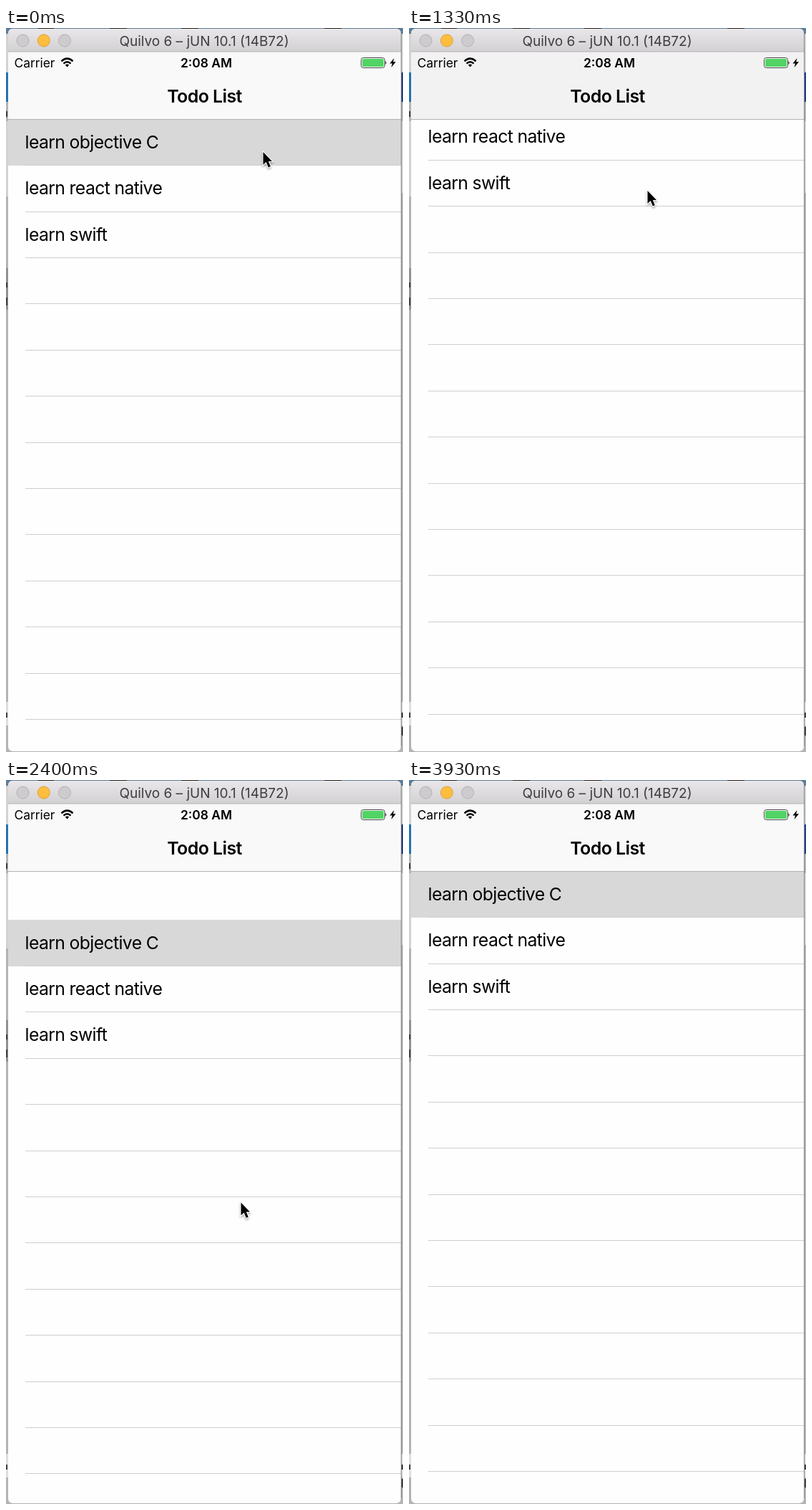
Recreate the animation shown at these times as an HTML page. Size 555x1010 px, loop 4.07 s.

```html
<!DOCTYPE html>
<html lang="en">
<head>
<meta charset="utf-8">
<title>Todo List</title>
<style>
  html, body { margin: 0; width: 100%; height: 100%; overflow: hidden; background: #b4b4b4; }
  svg { display: block; width: 555px; height: 1010px; font-family: Inter, Roboto, sans-serif; }
  .row { font-size: 24.7px; letter-spacing: -.6px; }
  .nav { font-size: 24.9px; font-weight: 600; letter-spacing: -.55px; }
  .status { font-size: 17.4px; }
  .mid { text-anchor: middle; }
</style>
</head>
<body>
<svg viewBox="0 0 555 1010">
  <defs>
    <linearGradient id="bar" x2="0" y2="1">
      <stop stop-color="#e9e7e9"/><stop offset="1" stop-color="#d2d0d2"/>
    </linearGradient>
    <clipPath id="window"><path d="M3 8q0-7 7-7H545q7 0 7 7V1002q0 7-7 7H10q-7 0-7-7Z"/></clipPath>
    <filter id="shadow" x="-50%" y="-50%" width="200%" height="200%">
      <feDropShadow dx="0" dy="2" stdDeviation="1.5" flood-opacity=".35"/>
    </filter>
  </defs>

  <!-- desktop showing around the window -->
  <rect width="555" height="1010" fill="#b4b4b4"/>
  <rect width="555" height="8" fill="#5d7d98"/>
  <path d="M45 0h22M145 0h24M245 0h24M445 0h24" stroke="#222" stroke-width="3"/>
  <path d="M0 8h3v54H0ZM552 8h3v54h-3ZM0 130h3v105H0ZM552 130h3v100h-3Z" fill="#d2d2d2"/>
  <path d="M0 62h3v41H0Z" fill="#2474b5"/>
  <path d="M552 62h3v41h-3Z" fill="#203f8e"/>
  <path d="M0 335h3v58H0Z" fill="#929292"/>
  <path d="M0 940h3v33H0ZM553 940h2v33h-2Z" fill="#dedede"/>
  <path d="M0 116h2v8H0ZM0 355h2v7H0ZM0 376h2v11H0ZM0 955h2v7H0ZM553 955h2v7h-2ZM553 975h2v12h-2Z" fill="#444"/>
  <path d="M552.5 8V1002" stroke="#858585"/>

  <g clip-path="url(#window)">
    <rect width="555" height="1010" fill="#fefefe"/>
    <rect id="selected" x="3" width="549" height="65" fill="#d8d8d8"/>
    <path id="lines" stroke="#cfced2"/>
    <g id="labels"></g>

    <rect x="3" y="33" width="549" height="94.5" fill="#f9f9f9"/>
    <rect id="tint" x="3" y="33" width="549" height="94.5"/>
    <path d="M3 127.5H552" stroke="#b3b3b3"/>
    <text class="nav mid" x="277.5" y="104">Todo List</text>

    <text class="status" x="11.5" y="55">Carrier</text>
    <text class="status mid" x="280" y="55" font-weight="600">2:08 AM</text>
    <g fill="none" stroke="#000" stroke-width="2.5">
      <path d="M77.5 46.3q8-7.4 16 0M80.5 49.6q5-4.6 10 0"/>
      <path d="M82.8 51.6q2.7-2.3 5.4 0L85.5 54.6Z" fill="#000" stroke="none"/>
    </g>
    <rect x="496.5" y="41.5" width="33" height="14" rx="3" fill="#fff" stroke="#444"/>
    <rect x="498" y="43" width="30" height="11" rx="1.5" fill="#51d465"/>
    <path d="M530.5 46q2.2 2.5 0 5ZM542.5 42L536.5 49.5H540L538.5 55L545 47.2H541.2Z"/>

    <rect x="3" y="1" width="549" height="32" fill="url(#bar)"/>
    <path d="M3 33H552" stroke="#b5b3b5"/>
    <g stroke="#b3b1b3" fill="#cdcbcd">
      <circle cx="23.5" cy="17.5" r="8.5"/>
      <circle cx="52.8" cy="17.5" r="8.5" fill="#fdbd3f" stroke="#dfa136"/>
      <circle cx="82" cy="17.5" r="8.5"/>
    </g>
    <text class="mid" x="277" y="24.7" font-size="19" fill="#3e3c3e">Quilvo 6 – jUN 10.1 (14B72)</text>
  </g>

  <path id="cursor" d="M.5 1V18.8L4.7 15L7.8 22.4L10.8 21.1L7.8 14H13Z"
        stroke="#fff" stroke-width="2" paint-order="stroke" filter="url(#shadow)"/>
</svg>

<script>
const LOOP = 4070, STEP = 200 / 3, RELEASE = 2140, PULL = 153.7;
const ROW = 64.4, TOP = 127.2;
const [selected, lines, labels, tint, cursor] =
  ['selected', 'lines', 'labels', 'tint', 'cursor'].map(id => document.getElementById(id));

labels.innerHTML = ['learn objective C', 'learn react native', 'learn swift']
  .map((label, i) => `<text class="row" x="26.5" y="${167.8 + i * ROW}">${label}</text>`)
  .join('');

// [time, value] keys
const dragKeys = [[0, 0], [270, 0], [470, 38], [600, 36.3], [1270, -82], [1330, -72.6], [1730, 116.2], [2100, PULL], [RELEASE, PULL]];
const cursorX = [[0, 359], [600, 350], [1330, 333], [1730, 350], [2130, 328], [2430, 328], [2900, -30]];
const cursorY = [[0, 172], [300, 260], [470, 331], [600, 328], [1200, 108], [1330, 223.5], [1730, 505], [2100, 588.5], [2430, 588.5], [2900, 800]];

// Cubic through the keys, resting at turning points
function follow(keys, t) {
  const last = keys.length - 1;
  if (t >= keys[last][0]) return keys[last][1];
  const i = keys.findIndex(k => k[0] > t) - 1;
  const rate = j => (keys[j + 1][1] - keys[j][1]) / (keys[j + 1][0] - keys[j][0]);
  const slope = j => {
    if (j === 0 || j === last) return 0;
    const a = rate(j - 1), b = rate(j);
    return a * b <= 0 ? 0 : 2 * a * b / (a + b);
  };
  const [t0, v0] = keys[i], [t1, v1] = keys[i + 1];
  const d = t1 - t0, u = (t - t0) / d, w = 1 - u;
  return v0 * (1 + 2 * u) * w * w + v1 * u * u * (3 - 2 * u)
       + d * u * w * (slope(i) * w - slope(i + 1) * u);
}

// The finger drags the list, then a critically damped spring returns it
function scrollAt(t) {
  if (t < RELEASE) return follow(dragKeys, t);
  const u = 7.2 * (t - RELEASE) / 1000;
  return PULL * (1 + u) * Math.exp(-u);
}

function draw() {
  const t = Math.floor((performance.now() % LOOP + 4) / STEP) * STEP;
  const offset = scrollAt(t);
  const edge = i => Math.floor(TOP + offset + i * ROW);
  let path = '';
  for (let i = 1; i < 17; i++) path += `M27 ${edge(i) + .5}H552`;
  lines.setAttribute('d', path);
  selected.setAttribute('y', edge(0));
  labels.setAttribute('transform', `translate(0 ${offset})`);
  tint.setAttribute('opacity', .026 * Math.min(1, Math.max(0, -offset / ROW)));
  cursor.setAttribute('transform', `translate(${follow(cursorX, t)} ${follow(cursorY, t)})`);
  requestAnimationFrame(draw);
}
draw();
</script>
</body>
</html>
```
